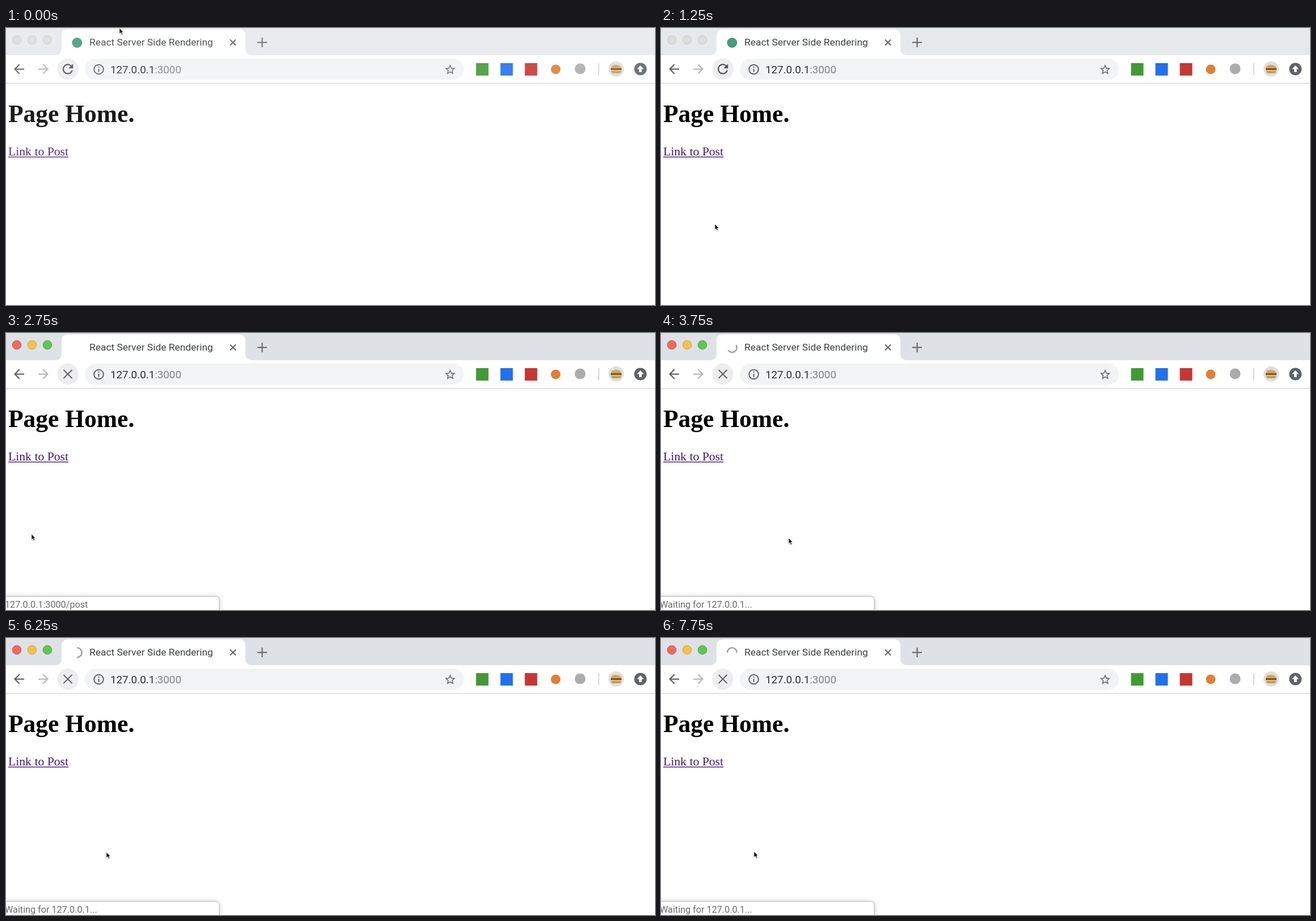
Write an HTML page that moves like this. It is 1144 px wide and 489 px high and loops after 8 s.

```html
<!DOCTYPE html>
<html lang="en">
<head>
<meta charset="utf-8">
<title>Server side rendering demo</title>
<style>
  html, body { margin: 0; width: 100%; height: 100%; overflow: hidden; background: #fff; }
  svg { display: block; }
  .ui { font-family: Roboto, Arial, sans-serif; }
  .page { font-family: "Liberation Serif", "Times New Roman", serif; }
  .line { fill: none; stroke: #5f6368; stroke-width: 2; }
</style>
</head>
<body>
<svg width="1144" height="489" viewBox="0 0 1144 489">
  <rect width="1144" height="489" fill="#fefefe"/>

  <!-- tab strip -->
  <rect id="strip" width="1144" height="48"/>
  <g id="lights" stroke-width="1">
    <circle cx="19" cy="21" r="7.8"/><circle cx="46" cy="21" r="7.8"/><circle cx="73" cy="21" r="7.8"/>
  </g>
  <path d="M86 48Q98 48 98 36V14Q98 2.500 109 2.500H411Q422 2.500 422 14V36Q422 48 434 48Z" fill="#fff"/>
  <circle id="favicon" cx="125.300" cy="26" r="9" fill="#4a9a7e"/>
  <path id="spinner" fill="none" stroke="#a3a3a3" stroke-width="2.600"/>
  <text class="ui" x="147" y="31.300" font-size="17.400" fill="#3c4043">React Server Side Rendering</text>
  <path class="line" d="M395 20.500l10 10m0-10l-10 10"/>
  <path class="line" d="M443 25.500h17m-8.500-8.500v17" stroke-width="2.400"/>

  <!-- toolbar -->
  <rect y="48" width="1144" height="49" fill="#fff"/>
  <rect y="97" width="1144" height="1.500" fill="#d9dadb"/>
  <path id="back" transform="translate(9.400 59) scale(1.130)" fill="#5f6368"
    d="M20 11H7.830l5.590-5.590L12 4l-8 8 8 8 1.410-1.410L7.830 13H20z"/>
  <use href="#back" transform="translate(89 0) scale(-1 1)" opacity=".45"/>
  <circle cx="109" cy="72.500" r="18.700" fill="#ededee"/>
  <path id="reload" transform="translate(95.200 58.700) scale(1.150)" fill="#4f5357"
    d="M17.650 6.350A7.960 7.960 0 0 0 12 4a8 8 0 1 0 7.730 10h-2.080A6 6 0 1 1 12 6c1.660 0 3.140.690 4.220 1.780L13 11h7V4z"/>
  <path id="stop" class="line" d="M101.500 65l15 15m0-15l-15 15"/>
  <rect x="139" y="54" width="668" height="37.500" rx="18.700" fill="#f1f3f4"/>
  <circle class="line" cx="163.500" cy="73" r="8.300" stroke-width="1.800"/>
  <path class="line" d="M163.500 72v5.500m0-9.500v2"/>
  <text class="ui" x="184" y="79.500" font-size="18.800" fill="#2b2e31">127.0.0.1<tspan fill="#80868b">:3000</tspan></text>
  <path transform="translate(771.800 62.200) scale(.930)" fill="#5f6368"
    d="M22 9.240l-7.190-.620L12 2 9.190 8.630 2 9.240l5.460 4.730L5.820 21 12 17.270 18.180 21l-1.630-7.030zM12 15.400l-3.760 2.270 1-4.280-3.320-2.880 4.380-.380L12 6.100l1.710 4.040 4.380.380-3.320 2.880 1 4.280z"/>

  <!-- extensions, avatar and update button -->
  <rect x="828.500" y="62" width="22" height="22" fill="#429a35"/>
  <rect x="871.500" y="62" width="22" height="22" fill="#2370ee"/>
  <rect x="914.500" y="62" width="22" height="22" fill="#c63733"/>
  <circle cx="969" cy="73" r="8.500" fill="#de8035"/>
  <circle cx="1012" cy="72" r="9.500" fill="#acacac"/>
  <rect x="1044" y="62" width="1.700" height="21" fill="#d0d2d4"/>
  <circle cx="1075.500" cy="72.500" r="13.500" fill="#dedede"/>
  <path d="M1066 71Q1067 65 1075 65T1085 71Z" fill="#d5a25f"/>
  <path d="M1066 71h19v3h-19z" fill="#75552f"/>
  <path d="M1066 74h19v2h-19z" fill="#e2c469"/>
  <path d="M1067 76h17q0 4-4 4h-9q-4 0-4-4" fill="#c99858"/>
  <circle cx="1118.300" cy="72.500" r="11" fill="#5f6368"/>
  <path d="M1118.300 66l6 6.500h-3.700v5.500h-4.600v-5.500h-3.700z" fill="#fff"/>

  <!-- page -->
  <g class="page">
    <text x="4" y="166" font-size="43.500" font-weight="700">Page Home.</text>
    <text x="4" y="225" font-size="21.700" fill="#3f1a78">Link to Post</text>
    <rect x="4" y="227" width="106" height="1.400" fill="#3f1a78"/>
  </g>

  <g id="status">
    <path d="M-5 465H370Q376 465 376 471V495H-5Z" fill="#fff" stroke="#b3b3b3"
      style="filter:drop-shadow(0 1px 4px #0003)"/>
    <text id="statusText" class="ui" x="-2" y="485" font-size="16.200" fill="#6b6b6b"></text>
  </g>
  <rect id="veil" width="1144" height="489" fill="#fff" opacity=".1"/>

  <g id="cursor" stroke="#fff" stroke-width=".8" style="filter:drop-shadow(0 1px 1px #0004)">
    <path id="arrow" d="M0 0V10L2.300 8 4 11.500 5.700 10.700 4.100 7.300H7Z"/>
    <path id="hand" d="M-1 1Q0-.5 1 1V5L5 6Q7 6.500 6.500 9L5.500 13H-.5L-4 8.500Q-3.500 6.500-1 8Z"/>
  </g>
</svg>
<script>
const LOOP = 8000, STEP = 250;
const el = id => document.getElementById(id);
const show = (id, on) => el(id).style.display = on ? '' : 'none';

// [time, x, y] of the pointer tip
const pointer = [
  [0, 200, 0], [500, 165, 150], [1000, 112, 351], [1250, 95, 346], [1500, 60, 260],
  [1750, 48, 216], [2500, 48, 216], [2750, 45, 355], [3750, 225, 362],
  [4500, 236, 374], [5000, 238, 378], [5250, 234, 378], [5750, 207, 384],
  [6250, 177, 378], [7000, 167, 377], [7500, 164, 377]
];
// [time, leading angle in degrees, counter-clockwise]
const spin = [[2750, 92], [3750, 395], [5250, 870], [6250, 1170], [7750, 1620]];

function sample(keys, t) {
  const i = keys.findIndex(k => k[0] > t);
  if (i < 0) return keys[keys.length - 1].slice(1);
  if (i === 0) return keys[0].slice(1);
  const a = keys[i - 1], b = keys[i], p = (t - a[0]) / (b[0] - a[0]);
  return a.slice(1).map((v, j) => v + (b[j + 1] - v) * p);
}

function spinnerPath(end) {
  const start = Math.max(90, end - 180), r = 8.4;
  const at = deg => {
    const a = deg * Math.PI / 180;
    return `${125.3 + r * Math.cos(a)} ${25.7 - r * Math.sin(a)}`;
  };
  return `M${at(start)}A${r} ${r} 0 0 0 ${at(end)}`;
}

function draw(t) {
  const active = t >= 1750, loading = t >= 2750, onLink = t >= 1750 && t < 2750;
  el('strip').setAttribute('fill', active ? '#dee1e6' : '#e6e9ec');
  const colors = active ? ['#ed6a5e', '#f5bf4f', '#61c554'] : Array(3).fill('#dcdcdc');
  const rims = active ? ['#d95549', '#dca63c', '#4dad40'] : Array(3).fill('#cfcfcf');
  [...el('lights').children].forEach((c, i) => {
    c.setAttribute('fill', colors[i]);
    c.setAttribute('stroke', rims[i]);
  });

  show('veil', t < STEP);
  show('favicon', !loading);
  show('reload', !loading);
  show('stop', loading);
  show('spinner', t > 2750);
  el('spinner').setAttribute('d', spinnerPath(sample(spin, t)[0]));

  show('status', t >= 2000);
  el('statusText').textContent = t < 3000 ? '127.0.0.1:3000/post' : 'Waiting for 127.0.0.1...';

  show('hand', onLink);
  show('arrow', !onLink);
  el('cursor').setAttribute('transform', `translate(${sample(pointer, t)})`);
}

function tick() {
  const t = performance.now() % LOOP;
  draw(Math.floor(t / STEP) * STEP);
  requestAnimationFrame(tick);
}
tick();
</script>
</body>
</html>
```
